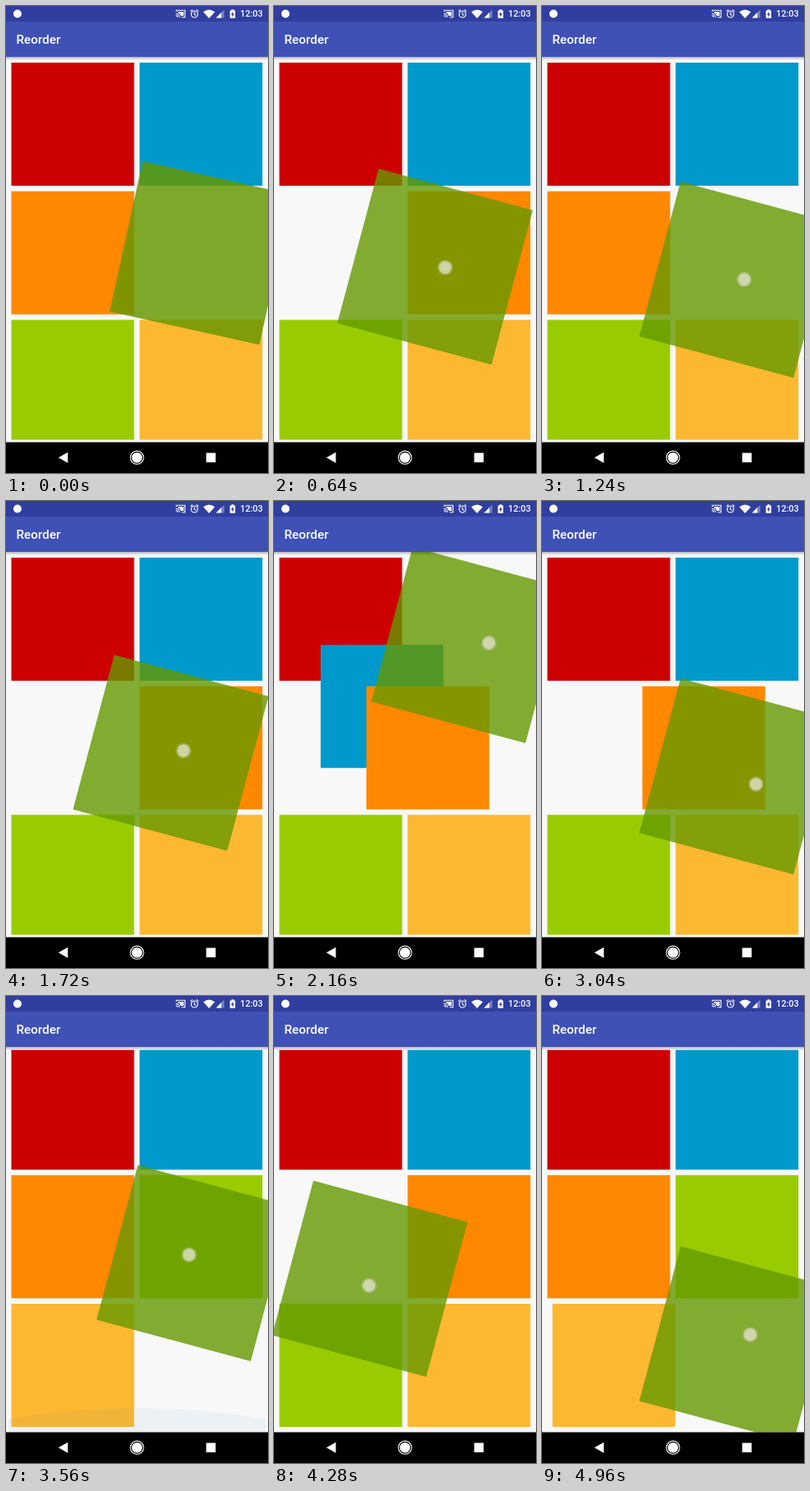
These frames come from a looping animation (320 by 569 pixels, 5000 ms). An HTML page with a canvas:

```html
<!DOCTYPE html>
<html lang="en">
<head>
<meta charset="utf-8">
<title>Reorder</title>
<style>
html, body { margin: 0; height: 100%; overflow: hidden; background: #f8f8f8; }
canvas { display: block; }
</style>
</head>
<body>
<canvas id="stage" width="320" height="569"></canvas>
<script>
const ctx = document.getElementById('stage').getContext('2d');
const LOOP = 5000, STEP = 40;
const MOVE = 250, LAG = 70, LEAD = 25;  // tile move, swap delay, finger ahead of tile
const SIZE = 150, PITCH = 156.7, LEFT = 6.5, TOP = 69, SCROLL = 7.4, BOTTOM_HIT = 3240;
const TILES = ['#c00', '#09c', '#f80', '#9c0', '#fdb831'];

// Key points of the drag: time, x, y
const PATH = [
  [0, 239, 301], [440, 123, 310], [760, 242, 322], [1240, 255, 333.5], [1500, 100, 318],
  [1820, 255, 292], [1935, 264, 222], [2160, 271, 175.5], [2420, 130, 175], [2700, 80, 280],
  [2885, 160, 340], [3040, 256, 335.5], [3240, 258, 445], [3400, 252, 450], [3560, 230, 325.5],
  [3800, 160, 278], [4280, 117, 344.5], [4500, 125, 455], [4672, 160, 460], [4960, 250, 424.5],
  [5040, 257, 370]
];

const clamp = (v, lo = 0, hi = 1) => Math.min(hi, Math.max(lo, v));
const ease = u => (1 - Math.cos(Math.PI * clamp(u))) / 2;

// Cubic Hermite through the key points
function drag(t) {
  const last = PATH.length - 1;
  const i = clamp(PATH.findIndex(p => p[0] > t) - 1, 0, last - 1);
  const slope = (k, axis) => {
    const a = PATH[Math.max(0, k - 1)], b = PATH[Math.min(last, k + 1)];
    return (b[axis] - a[axis]) / (b[0] - a[0]);
  };
  const a = PATH[i], b = PATH[i + 1], span = b[0] - a[0], u = (t - a[0]) / span, v = 1 - u;
  return [1, 2].map(k =>
    a[k] * v * v * (1 + 2 * u) + b[k] * u * u * (3 - 2 * u) +
    span * u * v * (slope(i, k) * v - slope(i + 1, k) * u));
}

const cell = slot => [LEFT + slot % 2 * PITCH, TOP + (slot >> 1) * PITCH];

function slotAt([x, y]) {
  const row = clamp(Math.floor((y - 66) / 156), 0, 2);
  return 2 * row + (x >= 160 ? 1 : 0);
}

// The other tiles make room shortly after the drag enters a new slot
const swaps = [];
for (let t = 0, slot = 3; t < LOOP; t++) {
  const next = slotAt(drag(t));
  if (next !== slot) swaps.push({ start: t + LAG, from: slot, to: next });
  slot = next;
}

function tilePosition(index, t) {
  const home = gap => cell(index < gap ? index : index + 1);
  let [x, y] = home(3);
  for (const { start, from, to } of swaps) {
    const [x0, y0] = home(from), [x1, y1] = home(to), u = ease((t - start) / MOVE);
    x += (x1 - x0) * u;
    y += (y1 - y0) * u;
  }
  return [x, y];
}

function rect(color, x, y, w, h) {
  ctx.fillStyle = color;
  ctx.fillRect(x, y, w, h);
}

function disc(color, x, y, r) {
  ctx.fillStyle = color;
  ctx.beginPath();
  ctx.arc(x, y, r, 0, 7);
  ctx.fill();
}

function fill(color, d) {
  ctx.fillStyle = color;
  ctx.fill(new Path2D(d));
}

function stroke(color, width, d) {
  ctx.strokeStyle = color;
  ctx.lineWidth = width;
  ctx.stroke(new Path2D(d));
}

function label(text, x, y, size) {
  ctx.font = `500 ${size}px Roboto, sans-serif`;
  ctx.fillStyle = '#fff';
  ctx.fillText(text, x, y);
}

function clipped(y0, y1, draw) {
  ctx.save();
  ctx.beginPath();
  ctx.rect(0, y0, 320, y1 - y0);
  ctx.clip();
  draw();
  ctx.restore();
}

function drawTiles(t) {
  const scroll = SCROLL * ease((t - BOTTOM_HIT) / 70);
  TILES.forEach((color, i) => {
    const [x, y] = tilePosition(i, t);
    rect(color, x, y - scroll, SIZE, SIZE);
  });
}

// Overscroll glow at the lower edge of the list
function drawGlow(t) {
  const k = ease((t - BOTTOM_HIT - 70) / 90) * (1 - ease((t - BOTTOM_HIT - 160) / 520));
  const h = 37 * k;
  fill(`rgba(0,110,180,${0.06 * k})`,
    `M3 531V${531 - h * 0.55}Q160 ${531 - h * 1.45} 317 ${531 - h * 0.55}V531Z`);
}

function drawDragged(t) {
  const lift = 1 - 0.17 * (1 - clamp(t / 120)) ** 2;
  const [x, y] = drag(t), left = LEFT + SIZE / 2;
  ctx.save();
  ctx.translate(clamp(x, left, left + PITCH), y);
  ctx.rotate(15 * lift * Math.PI / 180);
  ctx.scale(1 + 0.3 * lift, 1 + 0.3 * lift);
  ctx.globalAlpha = 1 - 0.2 * lift;
  rect('#690', -SIZE / 2, -SIZE / 2, SIZE, SIZE);
  ctx.restore();
}

function drawTouch(t) {
  if (t < STEP) return;
  const [x, y] = drag(t + LEAD);
  disc('rgba(200,205,185,.2)', x, y, 10);
  disc('rgba(200,205,185,.25)', x, y, 8.8);
  disc('rgba(240,240,230,.5)', x, y, 7.8);
  disc('rgba(215,222,180,.45)', x, y, 6.2);
}

function drawBars() {
  const shadow = ctx.createLinearGradient(0, 62, 0, 66);
  shadow.addColorStop(0, 'rgba(0,0,0,.27)');
  shadow.addColorStop(1, 'rgba(0,0,0,0)');
  rect(shadow, 0, 62, 320, 4);
  rect('#3f51b5', 0, 19, 320, 43);
  rect('#303f9f', 0, 0, 320, 19);
  label('Reorder', 12.4, 46, 15.4);
  label('12:03', 286, 13.4, 10.9);

  // Status icons
  disc('#fff', 14, 9.5, 5);
  stroke('#fff', 1.1, 'M208 7V5.2H218.6V13.8H214.5M207.5 9.4A4.4 4.4 0 0 1 211.9 13.8M207.5 11.6A2.2 2.2 0 0 1 209.7 13.8');
  fill('#fff', 'M210 7H217V12H213.6Q212.6 8.8 210 8Z');
  stroke('#fff', 1.2, 'M226.2 10A4 4 0 0 1 234.2 10A4 4 0 0 1 226.2 10M230.2 7.6V10.2L232 11.4M225.2 6.6L227.8 4.4M235.2 6.6L232.6 4.4');
  fill('#fff', 'M241 7.2Q248 2 255 7.2L248 15Z');
  fill('rgba(255,255,255,.35)', 'M256.5 14.5L266.5 4.5V14.5Z');
  fill('#fff', 'M256.5 14.5L263 8V14.5Z');
  fill('#fff', 'M273.5 5.5H275.3V4.3H278.3V5.5H280V14.8H273.5Z');
  fill('#303f9f', 'M277.3 6.8L274.7 10.7H276.4V13.6L279 9.6H277.3Z');

  // Navigation
  rect('#000', 0, 531.5, 320, 37.5);
  fill('#fff', 'M64 550.3L75.5 543.8V556.8Z');
  disc('#fff', 160, 550.2, 8.6);
  disc('#000', 160, 550.2, 7.5);
  disc('#fff', 160, 550.2, 6.3);
  rect('#fff', 244.5, 544.5, 11.5, 11.5);
}

function draw(t) {
  rect('#f8f8f8', 0, 0, 320, 569);
  clipped(65.7, 528.4, () => drawTiles(t));
  clipped(62, 531.5, () => {
    drawGlow(t);
    drawDragged(t);
  });
  drawBars();
  drawTouch(t);
}

const begin = performance.now();
function frame() {
  const t = (performance.now() - begin) % LOOP;
  draw(t - t % STEP);
  requestAnimationFrame(frame);
}
frame();
</script>
</body>
</html>
```
